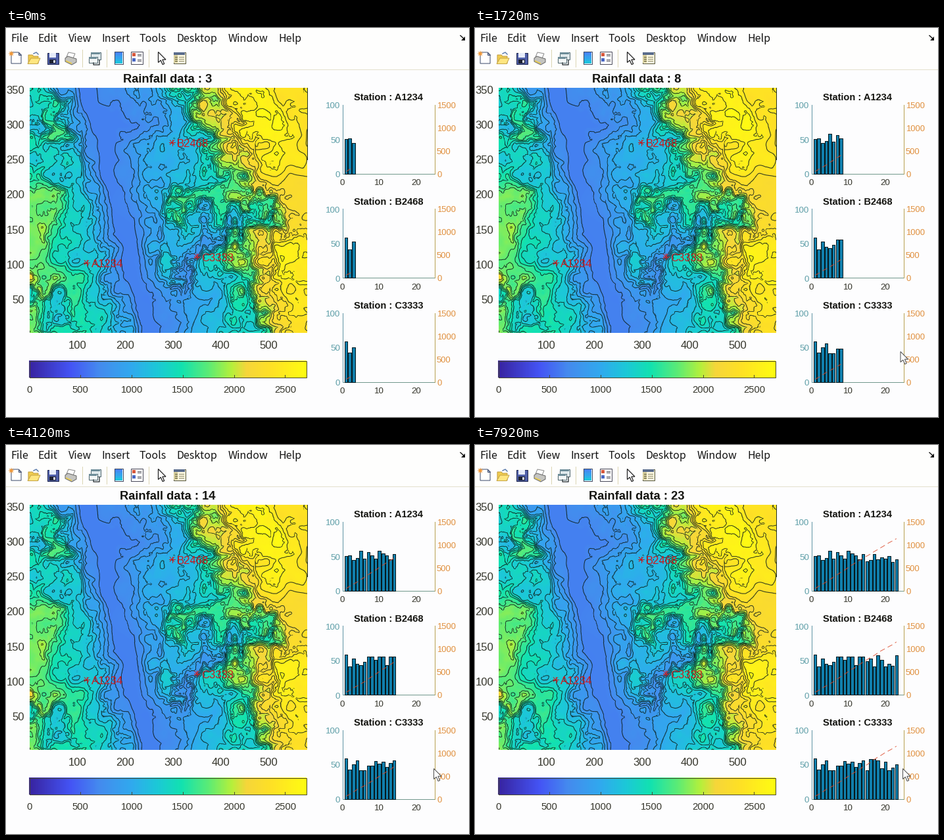
A matplotlib script for the animation above (8040 ms loop, 704 by 592 pixels).

```python
import numpy as np
import matplotlib.pyplot as plt
from matplotlib.animation import FuncAnimation
from matplotlib.collections import PolyCollection
from matplotlib.colors import LinearSegmentedColormap
from matplotlib.patches import Polygon, Rectangle

plt.rcParams["toolbar"] = "None"
W, H, DPI = 704, 592, 100
TICK, FRAMES = 40, 201
PT = 72 / DPI

BG, INK, RED = "#fdfdfe", "#36362c", "#cc1a1e"
COOL, WARM, BAR = "#5f9fa8", "#e08f3c", "#107fac"

fig = plt.figure(figsize=(W / DPI, H / DPI), dpi=DPI, facecolor=BG)
ax = fig.add_axes([0, 0, 1, 1])
ax.axis("off")
rng = np.random.default_rng(12)


# ---------- drawing helpers, all in stage pixels ----------
def label(x, cy, s, px, color=INK, ha="center", font="Liberation Sans", **kw):
    return ax.text(x, cy + 0.36 * px, s, fontsize=px * PT, color=color, ha=ha,
                   va="baseline", family=font, **kw)


def box(x, y, w, h, fc="none", ec="none", lw=1, z=2):
    return ax.add_patch(Rectangle((x, y), w, h, fc=fc, ec=ec, lw=lw * PT, zorder=z))


def poly(pts, fc="none", ec="none", lw=1, z=2):
    return ax.add_patch(Polygon(pts, fc=fc, ec=ec, lw=lw * PT, zorder=z))


def line(xs, ys, color=INK, lw=1, **kw):
    return ax.plot(xs, ys, color=color, lw=lw * PT, **kw)[0]


def picture(rgb, x, y, w, h):
    ax.imshow(rgb, extent=(x, x + w, y + h, y), interpolation="nearest",
              aspect="auto", zorder=1)


# ---------- terrain ----------
MX, MY, MW, MH = 36, 91, 422, 373
TOP, STEP, WATER = 2710, 110, 635
CMAP = LinearSegmentedColormap.from_list("relief", [
    (0, "#3824a0"), (.148, "#4454f5"), (.25, "#458aef"), (.37, "#30aaee"),
    (.46, "#1cc8d8"), (.55, "#12e2b0"), (.65, "#5eec74"), (.73, "#b4f03c"),
    (.785, "#f6d63a"), (.87, "#fee026"), (1, "#fefc12")], N=512)

# Height across the valley, by signed distance from the river.
CROSS = [-180, -140, -90, -50, -10, 10, 60, 120, 150, 180, 230]
HEIGHT = [1850, 1650, 1480, 1200, WATER, WATER, 950, 1150, 1400, 1950, 2350]
# Hills and hollows: centre x, y, height, spread x, y.
BUMPS = [(390, 145, 320, 40, 45), (425, 390, 320, 45, 50), (385, 278, -800, 50, 24),
         (268, 265, 560, 50, 22), (238, 355, 400, 20, 45), (205, 125, -280, 45, 45),
         (72, 130, 350, 20, 40), (38, 160, -450, 18, 35), (58, 270, 350, 22, 55),
         (45, 393, 380, 28, 18), (75, 432, -380, 40, 18)]


def noise(cell):
    """Smooth value noise in -1..1 over the map."""
    lat = rng.uniform(-1, 1, (MH // cell + 2, MW // cell + 2))

    def split(n):
        u = np.arange(n) / cell
        i = u.astype(int)
        f = u - i
        return i, f * f * (3 - 2 * f)

    i, f = split(MW)
    j, g = split(MH)
    rows = lat[:, i] * (1 - f) + lat[:, i + 1] * f
    return rows[j] * (1 - g)[:, None] + rows[j + 1] * g[:, None]


def folds():
    """Sharp creases at several scales, like spurs and gullies."""
    return sum(a * (2 * np.abs(noise(c)) - .7)
               for c, a in ((44, 20), (22, 12), (12, 6), (6, 2)))


def river(y):
    return np.interp(y, [91, 110, 165, 215, 315, 375, 464],
                     [122, 125, 150, 153, 185, 193, 222])


def brook(y):
    return np.interp(y, [268, 300, 348, 410], [355, 325, 290, 240])


def terrain():
    x, y = np.meshgrid(MX + np.arange(MW) + .5, MY + np.arange(MH) + .5)
    rough = .12 + .88 * np.clip((np.abs(x - river(y)) - 8) / 55, 0, 1)
    x, y = x + rough * folds(), y + rough * folds()
    z = np.interp(x - river(y), CROSS, HEIGHT)
    for cx, cy, h, sx, sy in BUMPS:
        z += h * np.exp(-((x - cx) / sx) ** 2 - ((y - cy) / sy) ** 2)
    z -= 330 * np.exp(-((x - brook(y)) / 20) ** 2 - ((y - 335) / 75) ** 4)
    relief = np.clip((z - WATER) / 900, 0, 1)
    z += relief * (130 * noise(36) + 70 * noise(18))
    z = np.clip(z, WATER, TOP - 20)

    f = z / STEP
    dy, dx = np.gradient(f)
    dist = np.abs(f - np.round(f)) / (np.hypot(dx, dy) + 1e-6)
    ink = .85 * np.clip(1.05 - dist, 0, 1)[..., None]
    return CMAP(z / TOP)[..., :3] * (1 - ink) + np.array([.05, .12, .1]) * ink


picture((terrain() * 255).astype(np.uint8), MX, MY, MW, MH)
line([457.5, 457.5], [91, 200], "#26321c")
for v in range(50, 351, 50):
    label(28, 466 - 1.063 * v, str(v), 16.67, ha="right")
for v in range(100, 501, 100):
    label(36 + .726 * v, 482, str(v), 16.67)

SITES = {"A1234": (122.5, 357), "B2468": (252.5, 174), "C3333": (290, 347.5)}
for name, (x, y) in SITES.items():
    for a in np.arange(4) * np.pi / 4:
        c, s = 4.5 * np.cos(a), 4.5 * np.sin(a)
        line([x - c, x + c], [y - s, y + s], RED)
    label(x + 7, y + 1, name, 16.67, RED, ha="left")

# ---------- colour bar ----------
picture(CMAP(np.linspace(0, 1, 422))[None], 35, 506, 422, 26)
box(35.5, 506.5, 421, 25, ec="#4a4a30")
for v in range(0, 2501, 500):
    x = 35.5 + .1556 * v
    line([x, x], [528, 532], "#4a4a30")
    label(x, 550, str(v), 14.7)

# ---------- menu and toolbar ----------
box(0, 0, W, 62, "#fefefd", z=0)
line([0, W], [62.5, 62.5], "#e4e0cc")
MENU = {"File": 8, "Edit": 49, "View": 95, "Insert": 146, "Tools": 203,
        "Desktop": 260, "Window": 338, "Help": 415}
for s, x in MENU.items():
    label(x - .5, 15, s, 16, "#141414", ha="left", font="Noto Sans CJK JP")
line([691, 697], [11.5, 17], "#111111", 1.4)
poly([(698, 12.5), (698, 18.5), (692, 18.5)], "#111111")
for x in (115.5, 152.5, 216.5):
    line([x, x], [33, 59], "#dcd6b4")


def new_page():
    poly([(8, 37), (19, 37), (23, 41), (23, 54), (8, 54)], "#ffffff", "#3c4a6a")
    poly([(19, 37), (19, 41), (23, 41)], "#b8c6e4", "#3c4a6a")
    ang = np.arange(16) * np.pi / 8
    r = np.where(np.arange(16) % 2, 2, 5)
    poly(np.c_[8 + r * np.cos(ang), 39 + r * np.sin(ang)], "#f09a3c")


def folder():
    poly([(34, 41), (40, 41), (42, 43), (49, 43), (49, 54), (34, 54)], "#f0cc50", "#c09c3c")
    poly([(38, 46), (52, 46), (48, 54.5), (33, 54.5)], "#ffe680", "#c4a444")
    line([42, 46, 49], [39, 37, 40], "#5f7fae", 1.5)


def floppy():
    box(62.5, 37.5, 17, 17, "#4f5fa8", "#20284c")
    box(66, 38, 10, 7, "#e6ecfa")
    box(66, 48, 10, 6, "#1c2030")
    box(72, 49, 3, 4, "#d8dce8")


def printer():
    poly([(95, 37), (105, 39), (102, 46), (92, 44)], "#ffffff", "#8a8a8a")
    poly([(90, 46), (94, 43), (107, 47), (107, 52), (100, 56), (90, 51)], "#c4c4c0", "#666666")
    poly([(91, 49), (100, 53), (100, 55), (91, 51)], "#e8cc50")


def linked():
    box(128.5, 36.5, 15, 11, "#dfe9ec", "#4c646c")
    box(129, 37, 14, 3, "#6c8c98")
    box(125.5, 43.5, 13, 9, "#f2f6f6", "#4c646c")
    box(126, 44, 12, 2.5, "#6c8c98")
    line([133, 133, 142, 142], [53, 55.5, 55.5, 49], "#3c4448", 1.5)


def bar_icon():
    for i in range(5):
        box(165, 36 + 3.6 * i, 12, 3.7, CMAP(.24 + .05 * i))
    box(164.5, 35.5, 13, 19, ec="#3a4660")


def legend_icon():
    box(189.5, 35.5, 18, 19, "#ffffff", "#4a4a5a")
    for y, c in ((38, "#d8583c"), (46, "#4a68c4")):
        box(192, y, 5, 5, c)
        for d in (1.5, 4):
            line([200, 205], [y + d, y + d], "#55555f")


def panel():
    box(254.5, 36.5, 18, 17, "#fbf6dc", "#56563c")
    box(255, 37, 17, 3.5, "#5a6c8c")
    box(255, 41, 6, 12, "#d8cf9c")
    for y in (44, 47, 50):
        line([256.5, 259.5], [y, y], "#56563c")
        line([263, 270], [y, y], "#8c8a70")


ARROW = np.array([(0, 0), (0, 16), (3.8, 12.6), (6.6, 19), (9.2, 18), (6.4, 11.6), (11.5, 11.6)])
for icon in (new_page, folder, floppy, printer, linked, bar_icon, legend_icon, panel):
    icon()
poly(ARROW + (231.5, 36.5), "#ffffff", "#1c1c1c", 1.2)

# ---------- station charts ----------
LEFT, UNIT, TALL, HOURS = 511.5, 5.62, 105, 23


class Station:
    def __init__(self, name, base):
        rain = rng.uniform(41, 59, HOURS)
        right, top = LEFT + 25 * UNIT, base - TALL
        label(581.5, top - 12, f"Station : {name}", 14.67, "#141410", weight="bold")
        line([LEFT, right], [base, base], "#72988c")
        line([LEFT, LEFT], [top, base], "#6094a4")
        line([right, right], [top, base], "#b8a050")
        for v in (0, 50, 100):
            label(508, base + .5 - v / 100 * TALL, str(v), 13.33, COOL, ha="right")
        for v in range(0, 1501, 500):
            label(655, base + .5 - v / 1500 * TALL, str(v), 13, WARM, ha="left")
        for v in (0, 10, 20):
            label(LEFT - .5 + v * UNIT, base + 12.5, str(v), 13.33)
        self.x = LEFT + UNIT * np.arange(1, HOURS + 1)
        self.total = base - np.cumsum(rain) / 1500 * TALL
        d = .4 * UNIT
        self.bars = [[(x - d, base), (x - d, y), (x + d, y), (x + d, base)]
                     for x, y in zip(self.x, base - rain / 100 * TALL)]
        self.coll = ax.add_collection(
            PolyCollection([], fc=BAR, ec="#06181c", lw=PT, zorder=3), autolim=False)
        self.sum = line([], [], "#dc4a2c", 1, ls=(0, (8, 5)), alpha=.85, zorder=4)

    def show(self, n):
        self.coll.set_verts(self.bars[:n])
        self.sum.set_data(self.x[:n], self.total[:n])


stations = [Station(name, 222 + 158.3 * k) for k, name in enumerate(SITES)]
title = label(246, 76, "", 18.33, "#141410", weight="bold")
pointer = poly(ARROW, "#ffffff", "#4a4a4a", 1, z=6)

ax.set_xlim(0, W)
ax.set_ylim(H, 0)

ENTER, REST = 200, 520


def update(i):
    t = i * TICK
    # The counter runs evenly, a little slower towards the end.
    n = int(np.interp(t, [0, 200, 5120, 7840], [3, 4, 17, HOURS]))
    title.set_text(f"Rainfall data : {n}")
    for s in stations:
        s.show(n)
    x = np.interp(t, [ENTER, REST, 3500, 3700], [668, 647, 647, 650.5])
    y = np.interp(t, [ENTER, REST], [534, 492.5])
    pointer.set_visible(t >= ENTER)
    pointer.set_xy(ARROW + (x, y))
    return []


anim = FuncAnimation(fig, update, frames=FRAMES, interval=TICK, repeat=True,
                     init_func=lambda: update(0))
plt.show()
```
